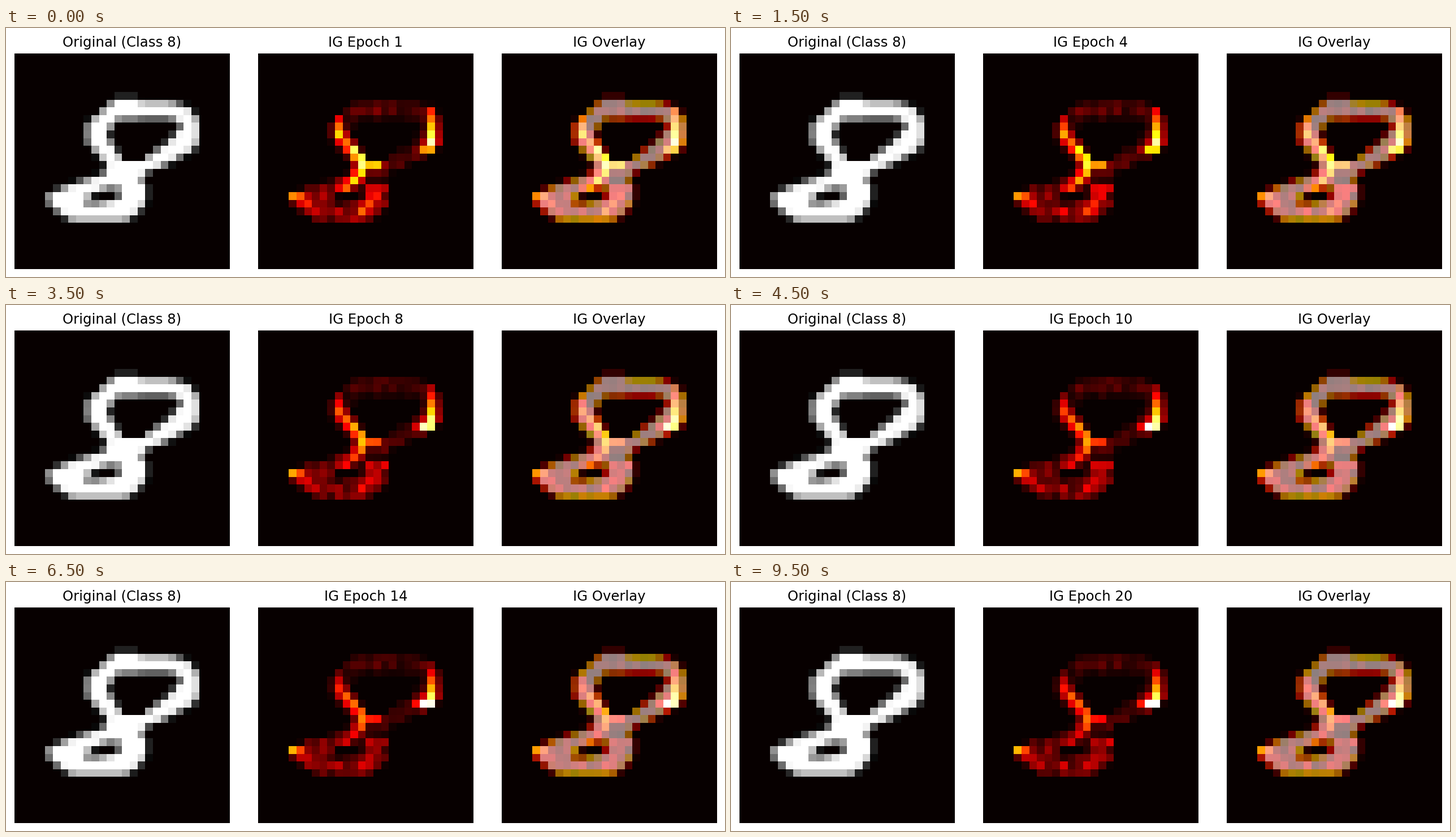
A matplotlib script that plays this animation: 1272x440 px, repeating every 10000 ms.

```python
import numpy as np
import matplotlib.pyplot as plt
from matplotlib.animation import FuncAnimation
from matplotlib.path import Path

W, H, DPI = 1272, 440, 100
N, SIDE, TOP = 28, 380.8, 44.9
LEFTS = (14.9, 446.1, 877.3)
EPOCHS, INTERVAL = 20, 500
BACK = np.array([7, 0, 0]) / 255

plt.rcParams["font.family"] = "DejaVu Sans"

# Outlines of the digit in cell units
BODY = [(12.6, 6.4), (13.1, 5.85), (16, 5.85), (16.4, 6.2), (20, 6.2),
        (22.6, 7), (23.8, 8.5), (23.9, 11.4), (23.1, 12.6), (19.5, 14.5),
        (17.2, 15.4), (16.4, 16.3), (17.2, 17.4), (17.1, 19.2), (16.1, 20.6),
        (14.4, 21.8), (7.6, 21.8), (5.5, 20.5), (4.3, 19.2), (4.3, 18.4),
        (6.4, 17.4), (11.7, 15.6), (12.1, 14.6), (9.5, 11.5), (9.5, 9.2),
        (11.3, 7.5)]
UPPER_HOLE = [(13.4, 8.5), (20.2, 8.35), (21.9, 9.2), (20, 11.5),
              (17.2, 13.5), (17, 14), (14.1, 14), (12.1, 10.8), (12.2, 10)]
LOWER_HOLE = [(9.2, 19.7), (9.8, 18.3), (12, 17.5), (13.6, 17.4),
              (13.7, 18.9)]

# Hot ridges: x, y, heat in the first epoch, heat it settles to
NECK = [(10.3, 8.5, .35, .12), (10.5, 10.4, .7, .38), (11.4, 11.7, .55, .55),
        (12.5, 12.6, .85, .5), (13.5, 14, .95, .55), (13.3, 15.5, .75, .5),
        (12.5, 16.5, .7, .32), (11, 17.6, .5, .3)]
BRANCH = [(14, 14.5, .65, .4), (15.6, 14.5, .68, .36)]
RIGHT_WALL = [(22.4, 7.3, .4, .1), (22.6, 9, .6, .42), (22.6, 11.4, .95, .75),
              (22, 12.5, .8, 1.5), (20.5, 12.4, .15, .4)]
TIP = [(4.5, 18.5, .68, .76), (6.5, 19.2, .48, .3)]
BELLY = [(15.5, 18, .45, .22), (13.5, 20.5, .52, .3)]
RIDGES = (NECK, BRANCH, RIGHT_WALL, TIP, BELLY)

rows, cols = np.mgrid[:N, :N]


def coverage(outline, fine=8):
    """Share of each cell that lies inside the outline."""
    steps = (np.arange(N * fine) + .5) / fine
    points = np.stack(np.meshgrid(steps, steps), -1).reshape(-1, 2)
    inside = Path(outline + outline[:1]).contains_points(points)
    return inside.reshape(N, fine, N, fine).mean(axis=(1, 3))


def ridge_heat(ridge, settled):
    heat = np.zeros((N, N))
    for (x0, y0, *heat0), (x1, y1, *heat1) in zip(ridge, ridge[1:]):
        dx, dy = x1 - x0, y1 - y0
        px, py = cols + .5 - x0, rows + .5 - y0
        along = np.clip((px * dx + py * dy) / (dx * dx + dy * dy), 0, 1)
        distance = np.hypot(px - along * dx, py - along * dy)
        first = heat0[0] + along * (heat1[0] - heat0[0])
        last = heat0[1] + along * (heat1[1] - heat0[1])
        level = first + settled * (last - first)
        heat = np.maximum(heat, level * np.exp(-(distance / .8) ** 2))
    return heat


digit = coverage(BODY) - coverage(UPPER_HOLE) - coverage(LOWER_HOLE)
digit = np.where(digit < .03, 0, digit)

rng = np.random.default_rng(8)
grain = rng.uniform(.4, 1.5, (N, N))
phase = rng.uniform(0, 2 * np.pi, (N, N))
speed = rng.uniform(.3, 1.1, (N, N))


def heat_map(epoch):
    settled = 1 - np.exp(-((epoch - 1) / 7) ** 1.5)
    level = np.where(rows >= 17, .22 - .04 * settled, .11 - .02 * settled)
    flicker = 1 + .2 * np.sin(speed * epoch + phase)
    heat = level * grain * flicker * digit ** 1.5
    edge = np.minimum(1, 1.5 * digit)
    for ridge in RIDGES:
        heat = np.maximum(heat, ridge_heat(ridge, settled) * edge)
    return np.clip(heat, 0, 1)


def colour(values, cmap):
    rgb = plt.get_cmap(cmap)(values)[..., :3]
    return np.where(values[..., None] < .01, BACK, rgb)


def panel(left, title):
    ax = fig.add_axes([left / W, 1 - (TOP + SIDE) / H, SIDE / W, SIDE / H])
    ax.axis("off")
    image = ax.imshow(np.zeros((N, N, 3)), interpolation="nearest", aspect="auto")
    label = fig.text((left + SIDE / 2) / W, 1 - 33 / H, title, fontsize=17.6,
                     ha="center", va="baseline")
    return image, label


fig = plt.figure(figsize=(W / DPI, H / DPI), dpi=DPI, facecolor="white")
original, _ = panel(LEFTS[0], "Original (Class 8)")
heat_image, heat_title = panel(LEFTS[1], "IG Epoch 1")
overlay, _ = panel(LEFTS[2], "IG Overlay")
original.set_data(colour(digit, "gray"))
digit_hot = colour(digit, "hot")


def update(frame):
    hot = colour(heat_map(frame + 1), "hot")
    heat_image.set_data(hot)
    overlay.set_data((digit_hot + hot) / 2)
    heat_title.set_text(f"IG Epoch {frame + 1}")
    return heat_image, overlay, heat_title


anim = FuncAnimation(fig, update, frames=EPOCHS, interval=INTERVAL,
                     repeat=True, repeat_delay=0)
plt.show()
```
